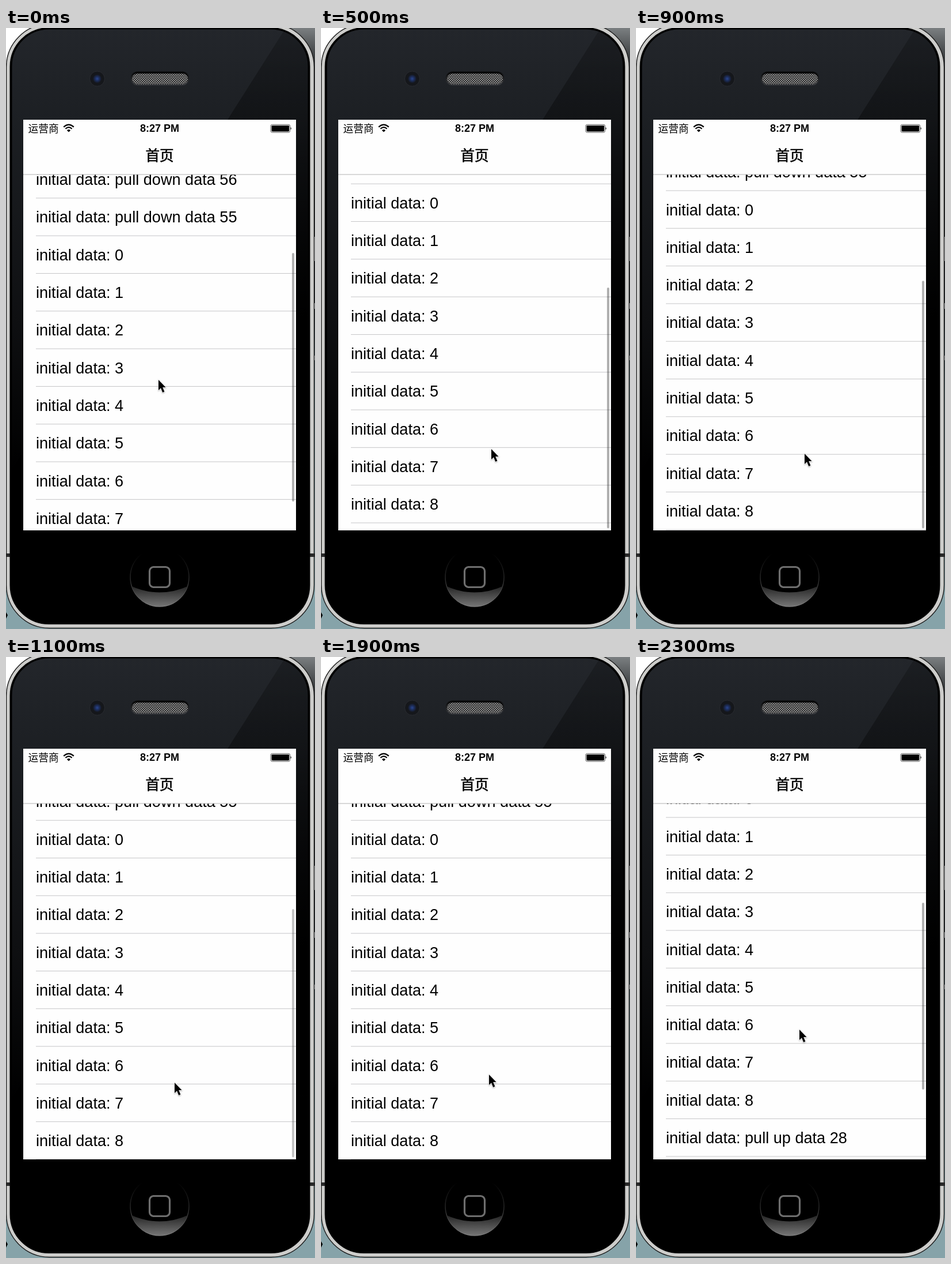
These frames come from a looping animation (537 by 1042 pixels, 2400 ms). An HTML page:

```html
<!DOCTYPE html>
<html lang="zh">
<head>
<meta charset="utf-8">
<title>List</title>
<style>
  html, body { margin: 0; width: 100%; height: 100%; overflow: hidden; background: #fff; }
  svg { display: block; }
  .cjk { font-family: "Noto Sans CJK SC", "Noto Sans CJK", sans-serif; }
  .latin { font-family: "Liberation Sans", Arial, sans-serif; }
  .list { font-size: 27.1px; }
</style>
</head>
<body>
<svg width="537" height="1042" viewBox="0 0 537 1042">
  <defs>
    <linearGradient id="face" x1="0" y1="0" x2="0" y2="1">
      <stop offset="0" stop-color="#23262b"/>
      <stop offset=".16" stop-color="#1c1f23"/>
      <stop offset=".5" stop-color="#0e0f11"/>
      <stop offset=".74" stop-color="#000"/>
    </linearGradient>
    <linearGradient id="shade" x1="0" y1="0" x2="0" y2="1">
      <stop offset="0" stop-color="#000" stop-opacity=".2"/>
      <stop offset=".22" stop-color="#000" stop-opacity=".38"/>
      <stop offset=".66" stop-color="#000"/>
    </linearGradient>
    <linearGradient id="side" x1="0" y1="0" x2="0" y2="1">
      <stop offset="0" stop-color="#7b7f81"/>
      <stop offset=".05" stop-color="#3a3d3f"/>
      <stop offset=".45" stop-color="#23282b"/>
      <stop offset=".6" stop-color="#5d7478"/>
      <stop offset="1" stop-color="#86a3a9"/>
    </linearGradient>
    <linearGradient id="slot" x1="0" y1="0" x2="0" y2="1">
      <stop offset="0" stop-color="#050505"/>
      <stop offset="1" stop-color="#3a3c40"/>
    </linearGradient>
    <linearGradient id="gloss" x1="0" y1="0" x2="0" y2="1">
      <stop offset="0" stop-color="#1c1c1c"/>
      <stop offset="1" stop-color="#858585"/>
    </linearGradient>
    <linearGradient id="ring" x1="0" y1="0" x2="0" y2="1">
      <stop offset=".1" stop-color="#000"/>
      <stop offset=".6" stop-color="#2e2e2e"/>
      <stop offset="1" stop-color="#8a8a8a"/>
    </linearGradient>
    <radialGradient id="lens">
      <stop offset="0" stop-color="#2a4690"/>
      <stop offset=".5" stop-color="#1c2c58"/>
      <stop offset="1" stop-color="#15181f"/>
    </radialGradient>
    <pattern id="mesh" width="4" height="4" patternUnits="userSpaceOnUse">
      <rect width="4" height="4" fill="#8b8b8b"/>
      <circle cx="1" cy="1" r="1.1" fill="#1d1d1d"/>
      <circle cx="3" cy="3" r="1.1" fill="#1d1d1d"/>
    </pattern>
    <clipPath id="body"><rect x="8" y="0" width="519" height="1033" rx="67"/></clipPath>
    <clipPath id="button"><circle cx="267" cy="952" r="51"/></clipPath>
    <clipPath id="view"><rect x="30" y="254" width="474" height="617"/></clipPath>
  </defs>

  <!-- desktop behind the phone -->
  <rect width="80" height="400" fill="#fff"/>
  <rect x="440" width="97" height="1042" fill="url(#side)"/>
  <rect y="917" width="537" height="125" fill="#86a3a9"/>
  <path d="M0 1013l3 5-3 6z"/>
  <path d="M536 362v42M536 477v10M536 568v8" stroke="#d5dada" stroke-width="2"/>

  <!-- phone -->
  <rect x=".5" y="-7" width="535" height="1047.5" rx="75" fill="#cdcdcb" stroke="#1c1c1c" stroke-width="1.4"/>
  <path d="M0 914h9M526 914h11" stroke="#292929" stroke-width="6"/>
  <rect x="7.5" y="0" width="520" height="1033" rx="67" fill="url(#face)" stroke="#050505" stroke-width="2"/>
  <g clip-path="url(#body)">
    <path d="M486 0H530V760H504V159H385Z" fill="url(#shade)"/>
    <path d="M8 772L30 735V871H530V1042H8Z"/>
    <rect x="8.5" y=".5" width="518" height="1032" rx="66" fill="none" stroke="#000" stroke-width="4"/>
  </g>

  <circle cx="158.5" cy="88" r="13" fill="#15171b" stroke="#2a2c31"/>
  <circle cx="158.5" cy="88" r="7.5" fill="url(#lens)"/>
  <rect x="216.5" y="75.5" width="102" height="24" rx="12" fill="url(#slot)"/>
  <rect x="219" y="79" width="97" height="18.5" rx="9" fill="url(#mesh)"/>

  <circle cx="267" cy="952" r="51" fill="#000" stroke="url(#ring)" stroke-width="1.5"/>
  <path d="M210 964Q267 993 324 964V1010H210Z" fill="url(#gloss)" clip-path="url(#button)"/>
  <rect x="249.5" y="934.5" width="35" height="35" rx="7" fill="none" stroke="#6e6e6e" stroke-width="3.2"/>

  <!-- screen -->
  <rect x="30" y="159" width="474" height="712" fill="#fefefe"/>
  <g clip-path="url(#view)">
    <g id="rows" class="latin list"></g>
    <rect id="bar" x="497" width="4" rx="2" fill="#000" fill-opacity=".31"/>
  </g>
  <rect x="30" y="253.5" width="474" height="1" fill="#b4b4b4"/>

  <text class="cjk" x="38.5" y="180.5" font-size="17.7">运营商</text>
  <g fill="none" stroke="#000" stroke-width="2.2">
    <path d="M100.2 171.6Q109 163.6 117.8 171.6M103.4 174.8Q109 169.6 114.6 174.8"/>
    <path d="M109 180.6L105.9 177.4Q109 174.8 112.1 177.4Z" fill="#000" stroke="none"/>
  </g>
  <text class="latin" x="267" y="180.3" font-size="18" font-weight="700" text-anchor="middle">8:27 PM</text>
  <rect x="460" y="167.4" width="33.6" height="13.6" rx="2.6" fill="none" stroke="#555"/>
  <rect x="461.5" y="168.9" width="30.6" height="10.6" rx="1.4"/>
  <path d="M494.7 171.8q2.4 2.4 0 4.8z"/>
  <text class="cjk" x="267" y="230.3" font-size="24.6" text-anchor="middle" stroke="#000" stroke-width=".6">首页</text>

  <path id="cursor" d="M0 0V18L4 14.3L7.2 22L10.4 20.6L7.2 13H12.6Z" stroke="#fff" stroke-width="1.4"
        paint-order="stroke" style="filter:drop-shadow(0 1.5px 1.2px rgba(0,0,0,.3))"/>
</svg>
<script>
const LOOP = 2400, STEP = 100, ROW = 65.31, REST = 316;
const $ = id => document.getElementById(id);

// [time, value] points; values between them are interpolated
const scrollY = [[0, 393], [100, 365], [200, 340], [300, 320], [400, 307], [500, 303], [600, 304.5],
  [700, 309], [800, 312.6], [900, 314.8], [1000, 315.6], [1100, REST], [1900, REST], [2000, 302],
  [2100, 282], [2300, 245.6]];
const barAlpha = [[0, 1], [1000, 1], [1100, .75], [1200, .3], [1300, 0], [1900, 0], [2000, 1]];
const cursorX = [[0, 265], [500, 296], [700, 295], [900, 293], [1800, 293], [1900, 292], [2100, 287], [2300, 284]];
const cursorY = [[0, 610], [200, 663], [400, 714], [500, 730], [700, 737], [900, 738], [1800, 738],
  [1900, 724], [2100, 679], [2300, 646]];

function at(points, t) {
  const i = points.findIndex(p => p[0] > t);
  if (i < 0) return points[points.length - 1][1];
  const [t0, a] = points[i - 1], [t1, b] = points[i];
  return a + (b - a) * (t - t0) / (t1 - t0);
}

function label(i) {
  if (i < 0) return `pull down data ${54 - i}`;
  return i > 8 ? `pull up data ${19 + i}` : i;
}

let markup = '';
for (let i = -2; i < 11; i++) {
  const y = i * ROW;
  markup += `<text x="52" y="${y + 9.7}">initial data: ${label(i)}</text>` +
    `<rect x="52" y="${y + 32}" width="452" height="1" fill="#c6c6c8"/>`;
}
$('rows').innerHTML = markup;

// The bar shrinks against the lower end while the list is overscrolled;
// it gets shorter once more rows have been loaded.
function barBox(y, loaded) {
  if (loaded) return [409 + (282 - y) * .47, 324];
  const top = y < REST ? 437 + REST - y : 437 - (y - REST) * .61;
  return [top, Math.min(431, 867.5 - top)];
}

function draw(now) {
  const t = Math.floor(now % LOOP / STEP) * STEP;
  const y = at(scrollY, t), [top, height] = barBox(y, t >= 1900);
  $('rows').setAttribute('transform', `translate(0 ${y})`);
  $('bar').setAttribute('y', top);
  $('bar').setAttribute('height', height);
  $('bar').setAttribute('opacity', at(barAlpha, t));
  $('cursor').setAttribute('transform', `translate(${at(cursorX, t)} ${at(cursorY, t)})`);
}

const start = performance.now();
function tick() {
  draw(performance.now() - start);
  requestAnimationFrame(tick);
}
tick();
</script>
</body>
</html>
```
